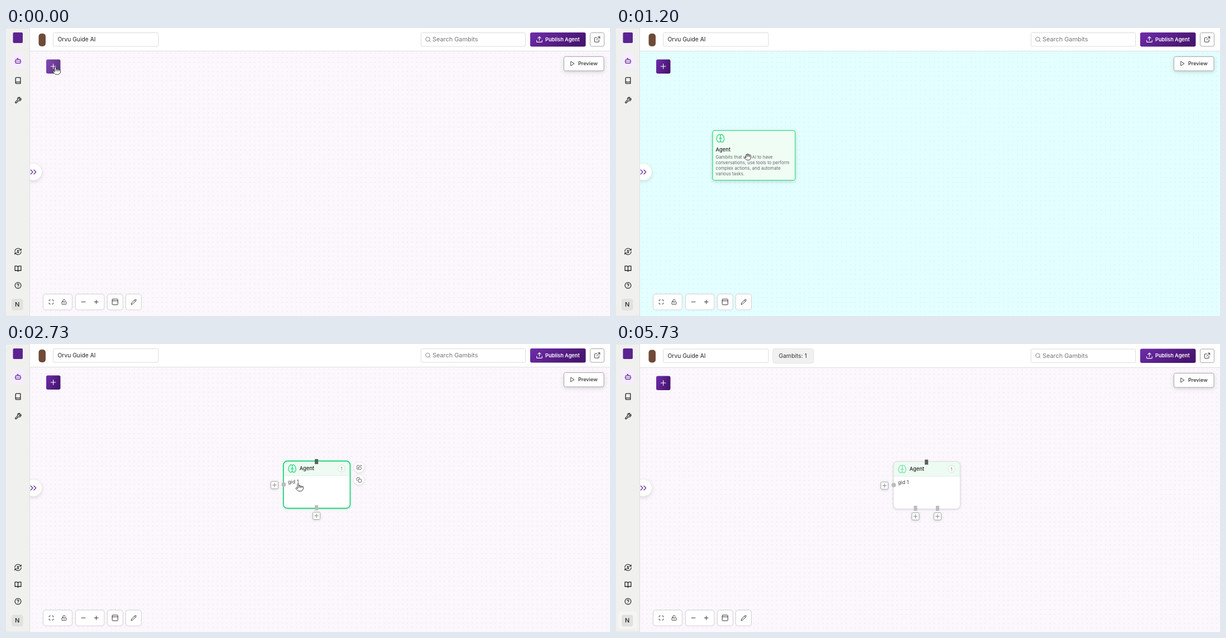
Recreate the animation shown at these times as an HTML page. Size 1082 by 518 pixels, loop 6200 ms.

```html
<!DOCTYPE html>
<html lang="en">
<head>
<meta charset="utf-8">
<title>Agent builder</title>
<style>
  html, body { margin: 0; width: 100%; height: 100%; overflow: hidden; background: #fff; }
  svg { display: block; font-family: Inter, "Open Sans", sans-serif; }
  .soft { filter: drop-shadow(0 1.5px 2px rgba(0, 0, 0, .15)); }
  .lift { filter: drop-shadow(0 2.5px 3.5px rgba(0, 0, 0, .15)); }
</style>
</head>
<body>
<svg id="stage" width="1082" height="518" viewBox="0 0 1082 518"></svg>
<script>
const LOOP = 6200, STEP = 200 / 3;
const PURPLE = '#5b2391', GREEN = '#1fd97c', INK = '#222';

// Outline icons on a 24 unit grid
const ICONS = {
  bot: 'M12 8V4H9M6 8h12a2 2 0 0 1 2 2v8a2 2 0 0 1-2 2H6a2 2 0 0 1-2-2v-8a2 2 0 0 1 2-2zM2 14h2M20 14h2M15 13v2M9 13v2',
  book: 'M4 19.5v-15A2.5 2.5 0 0 1 6.5 2H20v20H6.5a2.5 2.5 0 0 1 0-5H20',
  wrench: 'M14.7 6.3a1 1 0 0 0 0 1.4l1.6 1.6a1 1 0 0 0 1.4 0l3.77-3.77a6 6 0 0 1-7.94 7.94l-6.91 6.91a2.12 2.12 0 0 1-3-3l6.91-6.91a6 6 0 0 1 7.94-7.94l-3.76 3.76z',
  credits: 'M2 12a10 10 0 0 1 17.500-6.600L22 8M22 3v5h-5M22 12a10 10 0 0 1-17.500 6.600L2 16M2 21v-5h5M14.500 9.500c-1-1.500-5-1.500-5 .7 0 2.600 5 1 5 3.600 0 2.200-4 2.200-5 .7M12 7v1.500M12 15.500V17',
  reader: 'M2 3h6a4 4 0 0 1 4 4v14a3 3 0 0 0-3-3H2zM22 3h-6a4 4 0 0 0-4 4v14a3 3 0 0 1 3-3h7z',
  help: 'M2 12a10 10 0 1 0 20 0 10 10 0 1 0-20 0M9.1 9a3 3 0 0 1 5.8 1c0 2-3 3-3 3M12 17h.01',
  search: 'M3 11a8 8 0 1 0 16 0 8 8 0 1 0-16 0M21 21l-4.3-4.3',
  upload: 'M21 15v4a2 2 0 0 1-2 2H5a2 2 0 0 1-2-2v-4M17 8l-5-5-5 5M12 3v12',
  open: 'M18 13v6a2 2 0 0 1-2 2H5a2 2 0 0 1-2-2V8a2 2 0 0 1 2-2h6M15 3h6v6M10 14L21 3',
  play: 'M5 3l14 9-14 9z',
  chevrons: 'M5 18l6-6-6-6M14 18l6-6-6-6',
  fit: 'M8 3H5a2 2 0 0 0-2 2v3M21 8V5a2 2 0 0 0-2-2h-3M3 16v3a2 2 0 0 0 2 2h3M16 21h3a2 2 0 0 0 2-2v-3',
  lock: 'M5 11h14a2 2 0 0 1 2 2v7a2 2 0 0 1-2 2H5a2 2 0 0 1-2-2v-7a2 2 0 0 1 2-2zM7 11V7a5 5 0 0 1 9.9-1M12 15.5v2',
  minus: 'M4 12h16',
  plus: 'M4 12h16M12 4v16',
  cross: 'M5 5l14 14M19 5L5 19',
  layout: 'M5 3h14a2 2 0 0 1 2 2v14a2 2 0 0 1-2 2H5a2 2 0 0 1-2-2V5a2 2 0 0 1 2-2zM3 8.5h18',
  pencil: 'M17 3a2.85 2.83 0 1 1 4 4L7.5 20.5 2 22l1.5-5.5zM15 5l4 4',
  filter: 'M2 5h20M6 12h12M9 19h6',
  edit: 'M12 3H5a2 2 0 0 0-2 2v14a2 2 0 0 0 2 2h14a2 2 0 0 0 2-2v-7M18.4 2.6a2.1 2.1 0 0 1 3 3L12 15l-4 1 1-4z',
  copy: 'M11 9h9a2 2 0 0 1 2 2v9a2 2 0 0 1-2 2h-9a2 2 0 0 1-2-2v-9a2 2 0 0 1 2-2zM5 15H4a2 2 0 0 1-2-2V4a2 2 0 0 1 2-2h9a2 2 0 0 1 2 2v1',
  brain: 'M12 5a3 3 0 1 0-6 .1 4 4 0 0 0-2.5 5.8 4 4 0 0 0 .5 6.6A4 4 0 1 0 12 18zM12 5a3 3 0 1 1 6 .1 4 4 0 0 1 2.5 5.8 4 4 0 0 1-.5 6.6A4 4 0 1 1 12 18zM15 13a4.5 4.5 0 0 1-3-4 4.5 4.5 0 0 1-3 4',
  extract: 'M4 8V4a2 2 0 0 1 2-2h9l5 5v13a2 2 0 0 1-2 2H6a2 2 0 0 1-2-2v-2M14 2v6h6M14 13H2M6 9l-4 4 4 4',
  grab: 'M6 15V6a2 2 0 0 1 4 0V4a2 2 0 0 1 4 0v2a2 2 0 0 1 4 0v2a2 2 0 1 1 4 0v6a8 8 0 0 1-8 8h-2c-2.8 0-4.5-.9-6-2.3l-3.6-3.6a2 2 0 0 1 2.8-2.9zM10 6v5M14 6v5M18 8v4',
  point: 'M6 15V4a2 2 0 0 1 4 0v5a2 2 0 0 1 4 0v1a2 2 0 0 1 4 0v1a2 2 0 1 1 4 0v3a8 8 0 0 1-8 8h-2c-2.8 0-4.5-.9-6-2.3l-3.6-3.6a2 2 0 0 1 2.8-2.9zM10 9v4M14 10v3M18 11v2'
};

const icon = (name, x, y, size, color = INK, line = 1, fill = 'none') =>
  `<path d="${ICONS[name]}" transform="translate(${x - size / 2} ${y - size / 2}) scale(${size / 24})" fill="${fill}"
    stroke="${color}" stroke-width="${line * 24 / size}" stroke-linecap="round" stroke-linejoin="round"/>`;
const box = (x, y, w, h, r, fill, stroke = 'none', more = '') =>
  `<rect x="${x}" y="${y}" width="${w}" height="${h}" rx="${r}" fill="${fill}" stroke="${stroke}" ${more}/>`;
const disc = (x, y, r, fill, more = '') => `<circle cx="${x}" cy="${y}" r="${r}" fill="${fill}" ${more}/>`;
const text = (s, x, y, size, color = INK, weight = 400, more = '') =>
  `<text x="${x}" y="${y}" font-size="${size}" fill="${color}" font-weight="${weight}" ${more}>${s}</text>`;
const lines = (list, x, y, color) =>
  list.map((s, i) => text(s, x, y + i * 10.1, 7.9, color)).join('');
const group = (id, body, more = '') => `<g id="${id}" ${more}>${body}</g>`;

const header = () =>
  box(58.5, 10, 12.5, 23, 5, '#6f4a38') +
  box(84.5, 8.5, 188.5, 24.5, 2, '#fff', '#dcdcdc') + text('Orvu Guide AI', 92.5, 24.3, 10.3, INK) +
  group('count', box(281, 8, 73, 26, 4, '#f1f1f1', '#e2e2e2') + text('Gambits: 1', 291.5, 24.6, 10.4, '#333')) +
  box(743.5, 8.5, 187, 24.5, 2, '#fff', '#dcdcdc') + icon('search', 756, 20.5, 11, '#777', .9) +
  text('Search Gambits', 764, 24.4, 10.9, '#757575') +
  box(939, 8, 99.5, 25.5, 3, 'url(#violet)') + icon('upload', 955.5, 20.5, 13, '#fff', 1.1) +
  text('Publish Agent', 966, 23.6, 9.2, '#fff', 600) +
  box(1046.5, 8.5, 25, 24.5, 3, '#fff', '#a5a5a5') + icon('open', 1059, 20.5, 12.5, '#333', 1);

const sidebar = () =>
  box(-4, 0, 46.5, 518, 0, '#f0f0ef', '#dedede') +
  box(12.5, 8, 17.5, 19, 2, PURPLE) +
  box(10, 46, 23, 27, 4, '#f6ecfe') + icon('bot', 21.5, 59, 13, PURPLE, 1.2) +
  icon('book', 21.5, 94.5, 13, INK, 1.3) + icon('wrench', 21.5, 130, 13, INK, 1.2) +
  icon('credits', 21.5, 402, 13.5, INK, 1.1) + icon('reader', 21.5, 433, 13, INK, 1.3) +
  icon('help', 21.5, 463, 13, INK, 1.2) +
  group('userHover', box(4, 481, 34, 32, 5, '#f5f5f4')) +
  box(10, 487, 20.5, 21, 4, '#e1e2e0') + text('N', 20.2, 501.3, 11, '#222', 500, 'text-anchor="middle"');

const toolbar = () =>
  box(66.5, 478.5, 52, 28.5, 4, '#fff', '#d2cfd4') + icon('fit', 81, 492.7, 10, '#333', 1) + icon('lock', 104, 492.7, 10.5, '#333', .9) +
  box(124.5, 478.5, 51.5, 28.5, 4, '#fff', '#d2cfd4') + icon('minus', 138.7, 492.7, 10, '#333', 1) + icon('plus', 161.7, 492.7, 10, '#333', 1) +
  box(181.5, 478.5, 28, 28.5, 4, '#fff', '#d2cfd4') + icon('layout', 195.3, 492.7, 13.5, '#333', 1) +
  box(214.5, 478.5, 28, 28.5, 4, '#fff', '#d2cfd4') + icon('pencil', 228.8, 492.7, 11, '#333', 1);

const agentCard = () =>
  box(.5, .5, 148, 89.5, 4, '#f0fdf4', '#34dd84', 'stroke-width="1.3"') +
  icon('brain', 14.5, 14.5, 17, GREEN, 1.2) + text('Agent', 6, 37.7, 9.3, '#222', 500) +
  lines(['Gambits that use AI to have', 'conversations, use tools to perform', 'complex actions, and automate', 'various tasks.'], 6, 51.2, '#666');

const collectorCard = () =>
  box(.5, .5, 148, 89.5, 4, '#f0f8ff', '#b9e3f7') +
  icon('extract', 14.5, 14.5, 16, '#3bb9f0', 1.2) + text('Data Collector', 6, 37.7, 9.3, '#222', 500) +
  lines(['Extract specific information and', 'properties from user messages', 'automatically for structured data', 'processing and referencing.'], 6, 51.2, '#8d9297');

const TOOLS = [
  ['Custom Tools', ['Custom Tools provider for', 'third-party API integrations…']],
  ['Lively outreach', ['LivelyOutreach is a', 'marketing automation and…'], '#0a50f5'],
  ['Quorbi', ['Quorbi is an SEO and', 'marketing platform offering…'], '#0b4fd0'],
  ['Rowvanta', ['Rowvanta is a low-code', 'platform to build next-gen…'], '#f5b829'],
  ['Mirquel', ['Mirquel is a hosted search API', 'that provides developers wit…'], '#0b3df5'],
  ['Breezy forecast', ['Breezy Forecast provides', 'personal weather stations…'], '#56b5b5'],
  ['Wavelorne', [], '#2020a8'],
  ['Velmithic administrator', [], '#1a1a1a']
];
const toolCard = ([name, about, color], i) =>
  `<g transform="translate(${80 + i % 2 * 158.3} ${308.5 + (i >> 1) * 56.2})">` +
  box(.5, .5, 148, 46, 4, '#f3f4f6', '#e3e5e8') +
  (color ? box(7, 16, 15, 15, 1, color) : box(6, 15, 17, 17, 1, '#fafafa') + icon('wrench', 14.5, 23.5, 13.5, '#333', 1.1)) +
  text(name, 28.5, 15.4, 8.9, '#222', 500) + lines(about, 28.5, 29, '#8b8b8b') + '</g>';

const TAGS = [['AI Gambits', 78, 58], ['Tools', 141, 35], ['Knowledge', 182, 57], ['User Inputs', 245, 57.5], ['Integration Gambits', 308, 94]];
const tag = ([name, x, w]) => box(x, 136, w, 15, 7.5, '#efeff0') +
  text(name, x + w / 2, 146.3, 8, '#222', 500, 'text-anchor="middle"');

const panel = () =>
  box(68, 52, 338, 454.5, 4, '#fff', '#e6e3e8', 'stroke-width=".6" class="lift"') +
  text('Add Gambits', 78, 83.5, 10.7, '#111', 600) +
  text('Drag and Drop or Click to add gambits on canvas.', 78, 95, 8, '#858585') +
  icon('search', 367.5, 85, 13, PURPLE, 1.2) + icon('filter', 388, 85, 12.5, PURPLE, 1.1) +
  box(78.5, 103.5, 317, 25, 3, '#fff', '#dcdcdc') + icon('search', 91, 116, 11, '#777', .9) +
  text('Search Gambits', 99, 119.8, 10.5, '#757575') +
  `<g clip-path="url(#tagClip)">${TAGS.map(tag).join('')}</g>` +
  `<g clip-path="url(#listClip)">` +
  text('AI Gambits', 78, 178.2, 9.4, '#333') + text('Tools', 78, 301, 9.2, '#333') +
  `<g transform="translate(80 186.5)">${agentCard()}</g><g transform="translate(238.3 186.5)">${collectorCard()}</g>` +
  TOOLS.map(toolCard).join('') + '</g>' +
  box(390, 172, 4, 117.5, 2, '#c6c6c6') +
  '<path d="M389.5 169.5h5l-2.5-3zM389.5 496.5h5l-2.5 3z" fill="#c6c6c6"/>' +
  box(413.5, 50, 23.5, 22, 3, '#fff', 'none', 'class="soft"') + icon('cross', 425, 61, 10.5, '#222', 1.1);

const addBox = (x, y) => box(x - 6.5, y - 6.5, 13, 13, 2, '#fff', '#a9a9a9', 'class="soft"') + icon('plus', x, y, 10, '#777', .9);
const exit = x => box(x - 3, 290, 6, 9, 0, '#bcbcbc') + addBox(x, 309);
const roundTool = (name, y) => disc(632.5, y, 9, '#fff', 'class="soft"') + icon(name, 632.5, y, 10, '#555', .9);

const node = () =>
  box(497, 210.5, 119.5, 85, 7, '#fff', 'none', 'class="soft"') +
  '<path d="M497 237v-19.5a7 7 0 0 1 7-7h105.5a7 7 0 0 1 7 7v19.5z" fill="#edfbf2"/>' +
  '<path d="M497 237h119.5" stroke="#e3e9e5" stroke-width=".8"/>' +
  group('nodeIcon', icon('brain', 512.7, 224, 16.5, GREEN, 1.2)) +
  text('Agent', 525.7, 227.3, 9.3, '#222', 500) +
  disc(601, 223.7, 6.3, '#f8fdfa', 'stroke="#cfdcd4" stroke-width=".8"') +
  text('1', 601, 226.5, 7.5, '#777', 400, 'text-anchor="middle"') +
  text('gid 1', 505, 251.3, 9, '#444') +
  box(497, 210.5, 119.5, 85, 7, 'none', '#ddd', 'id="nodeEdge"') +
  box(553.2, 207, 6, 9, 0, '#5e5e5e') + disc(497.5, 252.7, 4, '#bcbcbc') + addBox(481, 253.7) +
  group('oneExit', exit(556.2)) + group('twoExits', exit(536.5) + exit(576)) +
  group('nodeTools', roundTool('edit', 222) + roundTool('copy', 244.5));

const canvas = () =>
  box(43, 41, 1039, 480, 0, '#fbf7fd', 'none', 'id="paper"') +
  box(43, 41, 1039, 480, 0, 'url(#dots)') +
  '<path d="M43 41.5h1039" stroke="#e0dce3"/>' +
  group('adder', box(72, 56.5, 25.5, 25.5, 3, 'url(#violet)') + icon('plus', 84.7, 69, 13, '#fff', 1.1)) +
  box(999.5, 51.5, 71.5, 25.5, 3, '#fff', '#a9a9a9', 'class="lift"') + icon('play', 1015, 64, 10, '#444', 1) +
  text('Preview', 1025, 67.2, 9, '#444', 600) + group('node', node());

const stage = document.getElementById('stage');
stage.innerHTML = `<defs>
  <linearGradient id="violet" x2="1" y2=".4"><stop stop-color="#6f2dab"/><stop offset="1" stop-color="#481570"/></linearGradient>
  <pattern id="dots" x="43" y="41" width="8.3" height="8.3" patternUnits="userSpaceOnUse">${disc(4, 4, .6, '#b9adc0', 'opacity=".6"')}</pattern>
  <clipPath id="tagClip"><rect x="78" y="134" width="317" height="20"/></clipPath>
  <clipPath id="listClip"><rect x="76" y="165" width="313" height="336"/></clipPath></defs>` +
  box(43, 0, 1039, 42, 0, '#fff') + group('canvas', canvas()) + group('header', header()) + toolbar() +
  disc(49, 259, 15, '#fff', 'class="lift"') + icon('chevrons', 48.7, 259, 15, PURPLE, 1.2) + sidebar() +
  group('panel', panel()) + group('drag', agentCard(), 'class="lift"') +
  group('hand', group('grab', icon('grab', 0, 0, 13.5, '#222', .9, '#fff')) + group('point', icon('point', 0, 0, 16, '#222', .9, '#fff')));

const part = {};
stage.querySelectorAll('[id]').forEach(el => part[el.id] = el);

// Cursor centre: time, x, y
const TRACK = [
  [0, 91, 77], [240, 91, 77], [400, 112, 135], [600, 141, 222], [730, 143, 232], [980, 143, 234],
  [1067, 164, 239], [1200, 235, 232], [1400, 445, 215], [1530, 497, 212], [1600, 499.5, 212.5], [2040, 499.5, 213],
  [2300, 510, 232], [2670, 525, 257], [2733, 526, 258], [3040, 526, 258], [3200, 430, 310], [3400, 260, 405],
  [3667, 126, 467], [3733, 101, 506], [4660, 171, 514], [4850, 245, 440], [5000, 283, 404],
  [5150, 283, 404], [5220, 286, 404], [5350, 205, 435], [5530, 45, 491], [5670, 10, 511]
];
function cursorAt(t) {
  const i = TRACK.findIndex(p => p[0] > t);
  if (i < 0) return TRACK[TRACK.length - 1].slice(1);
  const [t0, x0, y0] = TRACK[i - 1], [t1, x1, y1] = TRACK[i];
  const k = (t - t0) / (t1 - t0);
  return [x0 + (x1 - x0) * k, y0 + (y1 - y0) * k];
}

const show = (id, on) => part[id].style.display = on ? '' : 'none';
const move = (id, x, y) => part[id].setAttribute('transform', `translate(${x} ${y})`);

function draw(now) {
  const t = Math.floor((now % LOOP + 4) / STEP) * STEP + 1;
  const within = (a, b) => t >= a && t < b;
  const [x, y] = cursorAt(t);
  const dragging = within(1130, 1660), saved = t >= 2860;
  const active = within(2060, 3190);

  move('canvas', 0, saved ? 1 : 0);
  move('header', 0, saved ? .5 : 0);
  show('count', saved);
  part.paper.setAttribute('fill', dragging ? '#e3ffff' : '#fbf7fd');
  part.adder.style.opacity = t < 200 ? .86 : 1;

  show('panel', within(130, 1130));
  part.panel.style.opacity = Math.min(1, (t - 66) / 200);
  show('drag', dragging);
  move('drag', x - 63.5, y - 48);

  show('node', t >= 1860);
  show('nodeTools', active);
  show('oneExit', !saved);
  show('twoExits', saved);
  part.nodeIcon.style.opacity = active ? 1 : .6;
  part.nodeEdge.setAttribute('stroke', active ? GREEN : '#dcdfdd');
  part.nodeEdge.setAttribute('stroke-width', active ? 1.8 : 1.1);

  const pointing = t < 540 || within(2130, 3190) || within(3720, 3790) || t > 5500;
  show('hand', t < 3790 || within(4660, 5725));
  show('point', pointing);
  show('grab', !pointing);
  move('hand', x, y);
  show('userHover', t >= 5590);
}

function tick() {
  draw(performance.now());
  requestAnimationFrame(tick);
}
tick();
</script>
</body>
</html>
```
